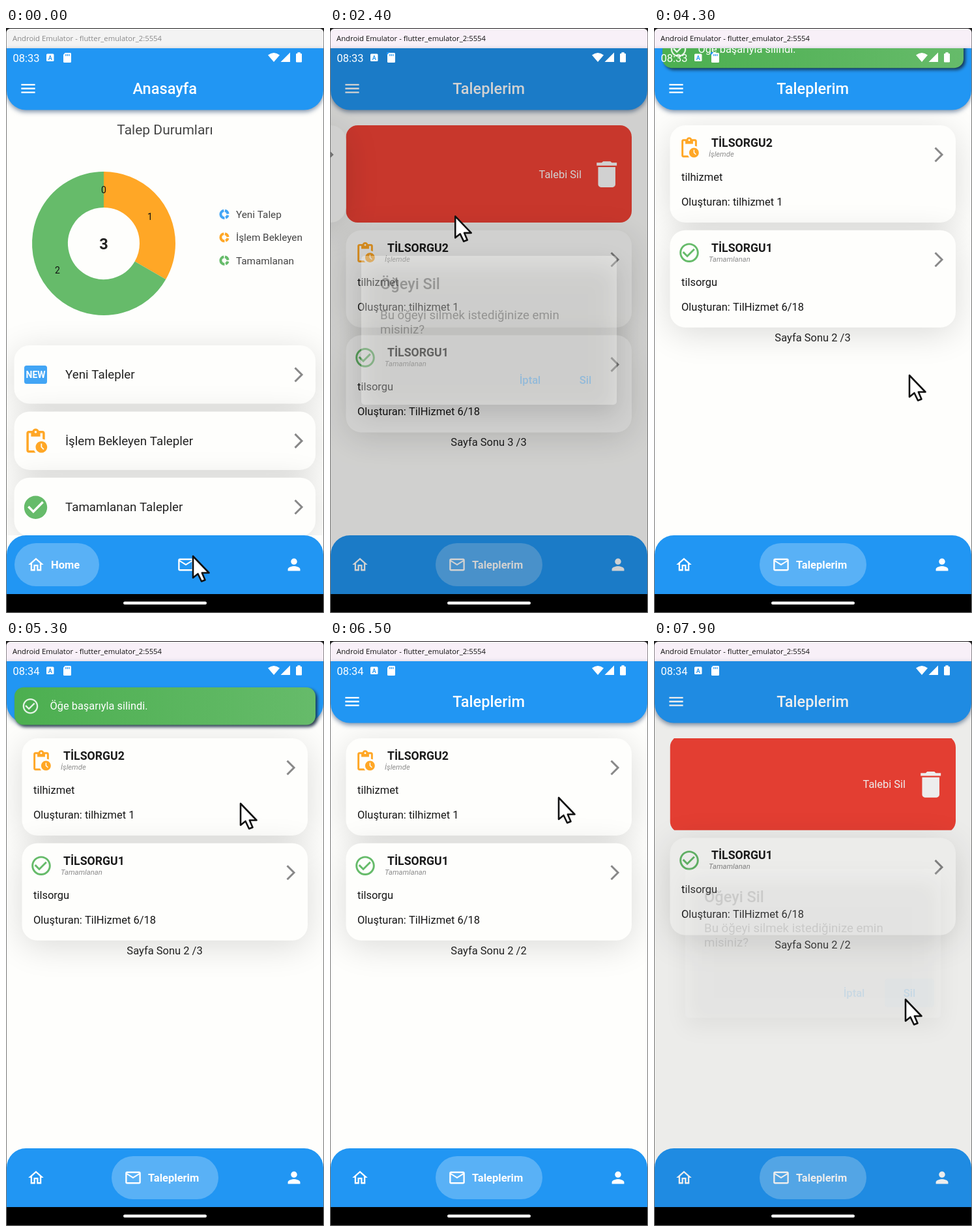
These frames come from a looping animation (488 px wide and 896 px high, 8000 ms). An HTML page with a canvas:

```html
<!DOCTYPE html>
<html lang="tr">
<head>
<meta charset="utf-8">
<title>Talep uygulaması</title>
<style>
html, body { margin: 0; width: 100%; height: 100%; overflow: hidden; background: #fff; }
canvas { display: block; width: 488px; height: 896px; }
</style>
</head>
<body>
<canvas id="stage" width="488" height="896"></canvas>
<script>
const ctx = document.getElementById('stage').getContext('2d');
const LOOP = 8000, STEP = 100;
const BLUE = '#2196f3', ORANGE = '#ffa726', GREEN = '#66bb6a', PAPER = '#fefefc';
const CARD = { x: 24.5, y: 149, w: 438.5, h: 149, pitch: 160.7 };

// Icons on a 24-unit grid
const ICON = {
  menu: 'M3 18h18v-2H3v2zm0-5h18v-2H3v2zm0-7v2h18V6H3z',
  home: 'M12 5.69l5 4.5V18h-2v-6H9v6H7v-7.81l5-4.5M12 3L2 12h3v8h6v-6h2v6h6v-8h3L12 3z',
  mail: 'M22 6c0-1.1-.9-2-2-2H4c-1.1 0-2 .9-2 2v12c0 1.1.9 2 2 2h16c1.1 0 2-.9 2-2V6zm-2 0l-8 5-8-5h16zm0 12H4V8l8 5 8-5v10z',
  person: 'M12 12c2.21 0 4-1.79 4-4s-1.79-4-4-4-4 1.79-4 4 1.79 4 4 4zm0 2c-2.67 0-8 1.34-8 4v2h16v-2c0-2.66-5.33-4-8-4z',
  done: 'M12 2C6.48 2 2 6.48 2 12s4.48 10 10 10 10-4.48 10-10S17.52 2 12 2zm-2 15l-5-5 1.41-1.41L10 14.17l7.59-7.59L19 8l-9 9z',
  check: 'M16.59 7.58L10 14.17l-3.59-3.58L5 12l5 5 8-8zM12 2C6.48 2 2 6.48 2 12s4.48 10 10 10 10-4.48 10-10S17.52 2 12 2zm0 18c-4.42 0-8-3.58-8-8s3.58-8 8-8 8 3.58 8 8-3.58 8-8 8z',
  pending: 'M17 12c-2.76 0-5 2.24-5 5s2.24 5 5 5 5-2.24 5-5-2.24-5-5-5zm1.65 7.35L16.5 17.2V14h1v2.79l1.85 1.85-.7.71zM18 3h-3.18C14.4 1.84 13.3 1 12 1s-2.4.84-2.82 2H6c-1.1 0-2 .9-2 2v15c0 1.1.9 2 2 2h6.11c-.59-.57-1.07-1.25-1.42-2H6V5h2v3h8V5h2v5.08c.71.1 1.38.31 2 .6V5c0-1.1-.9-2-2-2zm-6 2c-.55 0-1-.45-1-1s.45-1 1-1 1 .45 1 1-.45 1-1 1z',
  trash: 'M6 19c0 1.1.9 2 2 2h8c1.1 0 2-.9 2-2V7H6v12zM19 4h-3.5l-1-1h-5l-1 1H5v2h14V4z'
};
for (const k in ICON) ICON[k] = new Path2D(ICON[k]);
const ARROW = new Path2D('M0 0V33L7.5 27L13 38.5L18.5 36.5L13.8 25.5H24.5Z');

const TASKS = [
  { name: 'TİLEVRAK', done: true, note: 'belgeler', by: 'tilhizmet 1' },
  { name: 'TİLSORGU2', done: false, note: 'tilhizmet', by: 'tilhizmet 1' },
  { name: 'TİLSORGU1', done: true, note: 'tilsorgu', by: 'TilHizmet 6/18' }
];

// Each deletion: swipe, dialog, confirm
const DELETIONS = [
  { swipe: 1950, open: 2400, press: 3450, ok: 3550 },
  { swipe: 6650, open: 7100, press: 7650, ok: 7770 }
];

// time, x, y of the pointer tip
const POINTER = [
  [0, 287, 809], [100, 284, 812], [300, 284, 812], [400, 282, 812], [700, 282, 812],
  [1400, 366, 250], [1800, 358, 246], [2000, 358, 247], [2300, 170, 255], [2450, 200, 300],
  [3000, 372, 574], [3300, 389, 541], [3700, 389, 540], [4300, 392, 532], [5000, 364, 256],
  [5300, 360, 249], [5450, 360, 262], [5750, 356, 714], [5900, 355, 670], [6000, 354, 600],
  [6500, 351, 240], [6650, 350, 240], [6950, 165, 246], [7100, 190, 290], [7500, 386, 549]
];

const clamp = v => Math.max(0, Math.min(1, v));
const part = (t, from, length) => clamp((t - from) / length);
const ease = v => v * v * (3 - 2 * v);

function pointerAt(t) {
  const i = POINTER.findIndex(k => k[0] > t);
  if (i < 0) return POINTER[POINTER.length - 1].slice(1);
  const [a, b] = [POINTER[i - 1], POINTER[i]];
  const f = ease(part(t, a[0], b[0] - a[0]));
  return [a[1] + (b[1] - a[1]) * f, a[2] + (b[2] - a[2]) * f];
}

function text(s, x, y, size, color, style = '', align = 'left') {
  ctx.font = `${style} ${size}px Roboto, sans-serif`;
  ctx.textAlign = align;
  ctx.fillStyle = color;
  ctx.fillText(s, x, y);
}

function box(x, y, w, h, r, color) {
  ctx.beginPath();
  ctx.roundRect(x, y, w, h, r);
  ctx.fillStyle = color;
  ctx.fill();
}

function withShadow(color, blur, dx, dy, draw) {
  ctx.save();
  Object.assign(ctx, { shadowColor: color, shadowBlur: blur, shadowOffsetX: dx, shadowOffsetY: dy });
  draw();
  ctx.restore();
}

function clipped(x, y, w, h, draw) {
  ctx.save();
  ctx.beginPath();
  ctx.rect(x, y, w, h);
  ctx.clip();
  draw();
  ctx.restore();
}

function icon(name, cx, cy, size, color) {
  ctx.save();
  ctx.translate(cx - size / 2, cy - size / 2);
  ctx.scale(size / 24, size / 24);
  ctx.fillStyle = color;
  ctx.fill(ICON[name]);
  ctx.restore();
}

function arc(cx, cy, r, from, to, width, color) {
  ctx.beginPath();
  ctx.arc(cx, cy, r, from, to);
  ctx.lineWidth = width;
  ctx.strokeStyle = color;
  ctx.stroke();
}

function poly(color, ...p) {
  ctx.beginPath();
  for (let i = 0; i < p.length; i += 2) ctx.lineTo(p[i], p[i + 1]);
  ctx.fillStyle = color;
  ctx.fill();
}

function chevron(x, y) {
  ctx.beginPath();
  ctx.moveTo(x - 5.5, y - 10.5);
  ctx.lineTo(x + 5, y);
  ctx.lineTo(x - 5.5, y + 10.5);
  ctx.lineWidth = 3;
  ctx.strokeStyle = '#888';
  ctx.stroke();
}

function card(x, y, w, h) {
  withShadow('rgba(0,0,0,.14)', 52, 0, 9, () => box(x, y, w, h, 23.6, PAPER));
}

function spinner(cx, cy, r, t) {
  const a = t / 160;
  arc(cx, cy, r, a, a + 1.2 + 3 * Math.abs(Math.sin(t / 420)), r / 4, BLUE);
}

function homePage() {
  text('Talep Durumları', 244, 163, 21, '#444', '', 'center');
  const top = -Math.PI / 2, third = Math.PI * 2 / 3;
  arc(150, 330, 82.5, top, top + third, 55, ORANGE);
  arc(150, 330, 82.5, top + third, top + 3 * third, 55, GREEN);
  [['0', 0], ['1', third / 2], ['2', 2 * third]].forEach(([s, a]) =>
    text(s, 150 + 82 * Math.sin(a), 335 - 82 * Math.cos(a), 14, '#111', '', 'center'));
  text('3', 150, 338.5, 23.6, '#222', 'bold', 'center');

  [['Yeni Talep', '#42a5f5'], ['İşlem Bekleyen', ORANGE], ['Tamamlanan', GREEN]].forEach(([s, c], i) => {
    const y = 285.3 + i * 35.4;
    arc(335, y, 5.6, -1.4, -0.1, 4, c);
    arc(335, y, 5.6, 0.25, 1.2, 4, c);
    arc(335, y, 5.6, 1.5, 4.6, 4, c);
    text(s, 353, y + 5.5, 15.3, '#444');
  });

  ['Yeni Talepler', 'İşlem Bekleyen Talepler', 'Tamamlanan Talepler'].forEach((s, i) => {
    const y = 486 + i * 101.4, mid = y + 45;
    card(12.5, y, 462.5, 89.5);
    if (i === 0) {
      box(28, mid - 14, 35, 28, 3.5, '#42a5f5');
      text('NEW', 45.5, mid + 5, 14, '#fff', 'bold', 'center');
    } else {
      icon(i === 1 ? 'pending' : 'done', 45.5, mid + 0.5, 42.5, i === 1 ? ORANGE : GREEN);
    }
    text(s, 91, mid + 6.3, 18.8, '#222');
    chevron(449, mid);
  });
}

function taskCard(task, x, y) {
  card(x, y, CARD.w, CARD.h);
  icon(task.done ? 'check' : 'pending', x + 29.5, y + 34.5, 35.5, task.done ? GREEN : ORANGE);
  text(task.name, x + 63.5, y + 33, 17.7, '#1c1c1c', 'bold');
  text(task.done ? 'Tamamlanan' : 'İşlemde', x + 59.5, y + 48, 11.3, '#8c8c8c', 'italic');
  text(task.note, x + 17.5, y + 85, 16.5, '#161616');
  text('Oluşturan: ' + task.by, x + 17.5, y + 123, 16.5, '#161616');
  chevron(x + 412.5, y + 45);
}

function deleteBack(y, shown, height) {
  const top = y - (CARD.h - height) / 2;
  clipped(CARD.x + CARD.w - shown, y, shown, height, () => {
    box(CARD.x, top, CARD.w, CARD.h, 18, '#f44336');
    text('Talebi Sil', 386, top + 80.5, 16.4, '#fff', '', 'right');
    icon('trash', 424.7, top + 75, 53, '#fff');
  });
}

function taskPage(t) {
  const gone = t >= DELETIONS[0].ok + 300 ? 1 : 0;
  const act = DELETIONS[gone];
  const slide = ease(part(t, act.swipe, 400));
  const shrink = part(t, act.ok + 120, 180);
  let y = CARD.y;
  TASKS.slice(gone).forEach((task, i) => {
    if (i === 0 && slide > 0) {
      const height = CARD.h * (1 - shrink);
      deleteBack(y, CARD.w * slide, height);
      if (t < act.ok) taskCard(task, CARD.x - CARD.w * slide, y);
      y -= CARD.h - height;
    } else {
      taskCard(task, CARD.x, y);
    }
    y += CARD.pitch;
  });
  const total = t >= 6200 ? 2 : 3;
  text(`Sayfa Sonu ${3 - gone} /${total}`, 243.5, y + 9.3, 16.5, '#222', '', 'center');

  if (t > 5400 && t < 6350) {
    const r = 24 * (1 - part(t, 6200, 150));
    const cy = 95 + 95 * ease(part(t, 5400, 300));
    withShadow('rgba(0,0,0,.3)', 6, 0, 2, () => box(244 - r, cy - r, 2 * r, 2 * r, r, '#fff'));
    spinner(244, cy, r * 0.42, t);
  }
}

function appBar(title) {
  withShadow('rgba(0,40,90,.5)', 7, 0, 3, () => box(1, 31, 486, 94.5, [0, 0, 29.5, 29.5], BLUE));
  icon('menu', 34, 92.7, 28.3, '#fff');
  text(title, 243.7, 101, 23.6, '#fff', '500', 'center');
}

function navBar(t) {
  const f = ease(part(t, 550, 400));
  const tabs = [['home', 'Home', 64 * (1 - f), 1 - f], ['mail', 'Taleplerim', 98 * f, f], ['person', '', 0, 0]];
  const gap = (462 - 198 - tabs[0][2] - tabs[1][2]) / 2;
  box(1, 777, 486, 90, [29.5, 29.5, 0, 0], BLUE);
  let x = 13;
  for (const [name, label, extra, on] of tabs) {
    const w = 66 + extra;
    box(x, 789, w, 66, 33, `rgba(255,255,255,${0.25 * on})`);
    icon(name, x + 33, 822, 28.3, '#fff');
    if (on > 0) clipped(x, 789, w - 16, 66, () => text(label, x + 56, 827.5, 16.5, `rgba(255,255,255,${on})`, 'bold'));
    x += w + gap;
  }
}

function dialog(t) {
  const act = DELETIONS.find(d => t >= d.open && t < d.ok + 150);
  if (!act) return;
  const alpha = Math.min(part(t, act.open - 50, 150), 1 - part(t, act.ok, 150));
  ctx.fillStyle = `rgba(0,0,0,${0.54 * alpha})`;
  ctx.fillRect(1, 31, 486, 836);
  ctx.globalAlpha = alpha;
  withShadow('rgba(0,0,0,.4)', 36, 0, 14, () => box(48, 349, 392, 228, 5, PAPER));
  text('Öğeyi Sil', 77, 400, 23.6, '#222', '500');
  text('Bu öğeyi silmek istediğinize emin', 77, 446, 18.7, '#222');
  text('misiniz?', 77, 468, 18.7, '#222');
  if (t >= act.press) box(354, 517, 76, 44, 5, 'rgba(33,150,243,.14)');
  text('İptal', 307, 545, 16.5, BLUE, '500', 'center');
  text('Sil', 392, 545, 16.5, BLUE, '500', 'center');
  ctx.globalAlpha = 1;
}

function toast(t) {
  const v = Math.min(part(t, 3880, 1000), 1 - part(t, 5590, 1000));
  const dy = 363 * (Math.sqrt(1 - (1 - v) ** 2) - 1);
  if (dy < -115) return;
  const fill = ctx.createLinearGradient(13, 0, 475, 0);
  fill.addColorStop(0, '#4caf50');
  fill.addColorStop(1, GREEN);
  clipped(1, 31, 486, 836, () => {
    withShadow('rgba(20,40,60,.85)', 5, 3, 3, () => box(13, 71 + dy, 462, 57.5, 14, fill));
    icon('check', 37.5, 99.7 + dy, 28.3, 'rgba(255,255,255,.85)');
    text('Öğe başarıyla silindi.', 67.5, 105 + dy, 16.4, '#fff');
  });
}

function statusBar(t) {
  text(t < 4800 ? '08:33' : '08:34', 10.5, 52, 16.5, '#fff');
  box(62, 39.5, 11.5, 11.5, 1.5, '#fff');
  text('A', 67.8, 48.7, 9, BLUE, 'bold', 'center');
  box(88, 38, 12, 15, 1.5, '#fff');
  poly(BLUE, 87, 37, 91.5, 37, 87, 42);
  ctx.fillStyle = BLUE;
  for (let i = 0; i < 3; i++) ctx.fillRect(91.3 + i * 2.5, 40, 1.2, 3);
  ctx.beginPath();
  ctx.moveTo(411, 52);
  ctx.lineTo(402, 41.5);
  ctx.quadraticCurveTo(411, 34.5, 420, 41.5);
  ctx.fillStyle = '#fff';
  ctx.fill();
  poly('#fff', 421.5, 52, 436, 52, 436, 37.5);
  box(445, 39, 9, 13.5, 1.2, '#fff');
  box(447.3, 37.3, 4.4, 2.5, 0.5, '#fff');
}

function windowFrame(focused) {
  ctx.fillStyle = '#222';
  ctx.fillRect(0, 0, 488, 31);
  box(0.5, 1, 487, 34, [6, 6, 0, 0], focused ? '#f8f0f8' : '#f3f3f3');
  ctx.font = '11.3px "Open Sans", sans-serif';
  ctx.textAlign = 'left';
  ctx.fillStyle = focused ? '#111' : '#8a8a8a';
  ctx.fillText('Android Emulator - flutter_emulator_2:5554', 10, 20);
}

function draw(t) {
  const onTasks = t >= 600;
  ctx.fillStyle = '#fefefd';
  ctx.fillRect(0, 0, 488, 896);
  windowFrame(onTasks);
  ctx.fillStyle = PAPER;
  ctx.fillRect(0, 31, 488, 840);
  clipped(1, 31, 486, 746, () => {
    if (!onTasks) homePage();
    else if (t < 900) spinner(244, 451, 19, t);
    else taskPage(t);
  });
  appBar(onTasks ? 'Taleplerim' : 'Anasayfa');
  navBar(t);
  dialog(t);
  toast(t);
  statusBar(t);

  ctx.fillStyle = '#000';
  ctx.fillRect(0, 867, 488, 29);
  box(180, 878.5, 128, 4.5, 2.2, '#fff');
  ctx.fillStyle = '#777';
  ctx.fillRect(0, 31, 1, 865);
  ctx.fillRect(487, 31, 1, 865);
  ctx.fillRect(0, 895, 488, 1);

  ctx.save();
  ctx.translate(...pointerAt(t));
  ctx.lineJoin = 'round';
  ctx.lineWidth = 2.6;
  ctx.strokeStyle = '#111';
  ctx.fillStyle = '#fff';
  ctx.fill(ARROW);
  ctx.stroke(ARROW);
  ctx.restore();
}

const start = performance.now();
function tick() {
  const t = (performance.now() - start) % LOOP;
  draw(Math.floor(t / STEP) * STEP);
  requestAnimationFrame(tick);
}
tick();
</script>
</body>
</html>
```
